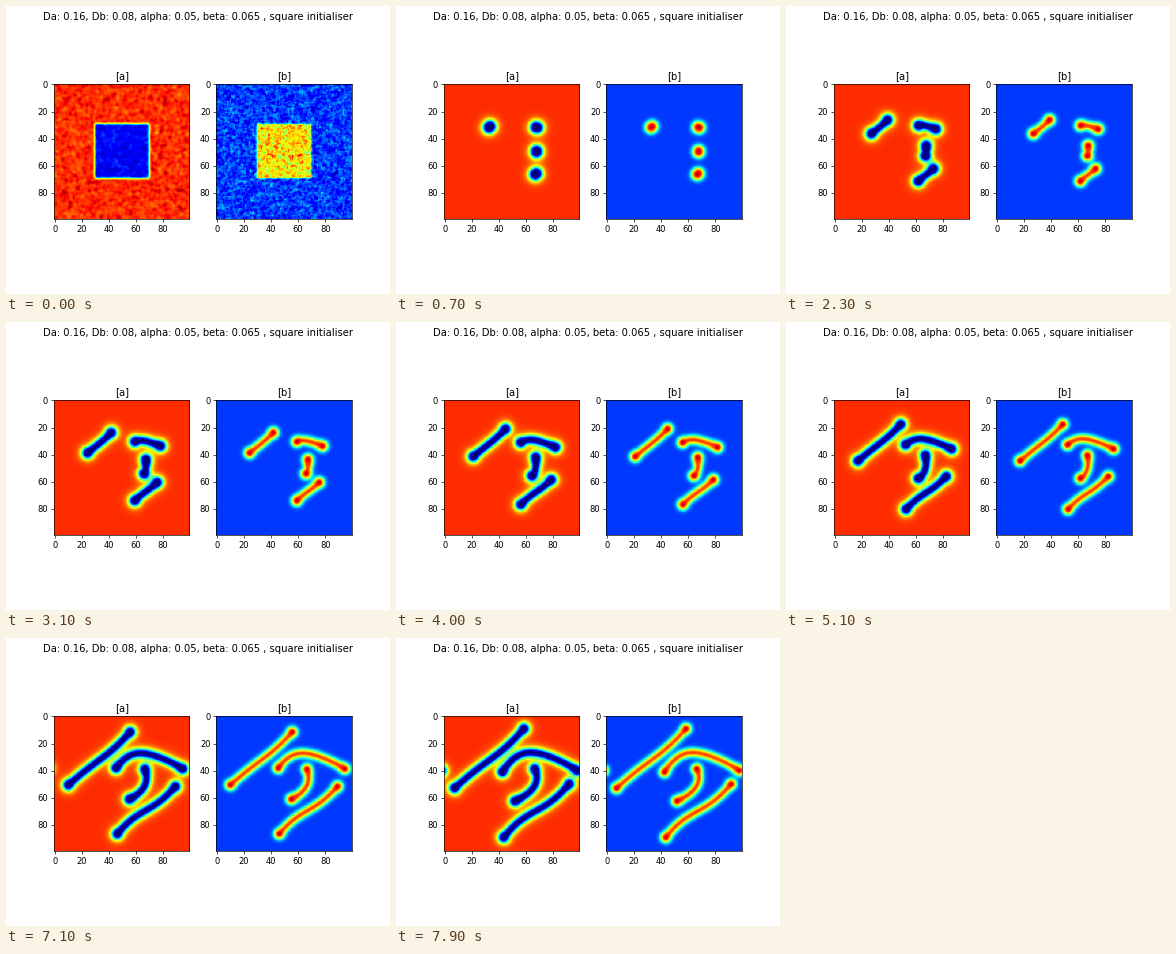
Recreate the animation shown at these times as a matplotlib script. Size 384 by 288 pixels, loop 8000 ms.

```python
import numpy as np
import matplotlib.pyplot as plt
from matplotlib.animation import FuncAnimation

N = 100
FRAMES, INTERVAL = 80, 100
A_REST, B_REST = 0.862, 0.18

grid = np.arange(N)
u = np.linspace(0, 1, 45)
rng = np.random.default_rng(4)


class Strand:
    """A spot that stretches into a curved strand with two growing tips."""

    def __init__(self, seed, tips, middle, sway=0.0, curls=((0, 0), (0, 0))):
        self.seed = np.array(seed)
        self.tips = np.array(tips)
        self.middle = np.array(middle)
        self.sway = sway
        self.curls = np.array(curls)

    def path(self, p):
        """Points at growth p: a parabola with a slight S bend."""
        tips = self.seed + p * (self.tips - self.seed) + 2 * p * (1 - p) * self.curls
        mid = self.seed + p * (self.middle - self.seed)
        span = tips[1] - tips[0]
        length = np.hypot(*span)
        normal = np.array([-span[1], span[0]]) / length
        bend = self.sway * (length / 60) ** 2 * np.sin(2 * np.pi * u)
        points = (np.outer((1 - u) * (1 - 2 * u), tips[0])
                  + np.outer(4 * u * (1 - u), mid)
                  + np.outer(u * (2 * u - 1), tips[1])
                  + np.outer(bend, normal))
        return points, length

    def fields(self, p):
        """Loss of a and gain of b around the strand."""
        points, length = self.path(p)
        dx2 = wrap(grid[:, None] - points[:, 0]) ** 2
        dy2 = wrap(grid[:, None] - points[:, 1]) ** 2
        dist = np.sqrt(dy2[:, None, :] + dx2[None, :, :])
        from_tip = length * np.minimum(u, 1 - u)
        bulge = 0.9 + 0.6 * np.exp(-length / 8)
        edge = (dist - bulge * np.exp(-(from_tip / 3) ** 2)).min(axis=2)
        edge = np.maximum(edge, 0)
        tip = np.minimum(dist[..., 0], dist[..., -1])
        loss = 1.1 / (1 + np.exp((edge - 2.5) / 1.35))
        loss += 0.04 * np.exp(-(edge / 7) ** 2)
        gain = 0.67 * np.exp(-(edge / 3.25) ** 2)
        gain += 0.08 * np.exp(-(tip / 2.2) ** 2)
        return loss, gain


STRANDS = [
    Strand((33, 31.8), [(7.3, 53.2), (58.3, 9.6)], (33.4, 32.3), -0.6),
    Strand((67.6, 32.2), [(42.5, 41.4), (97.4, 40.3)], (66.5, 27.3), -1.5,
           [(0, -10), (0, -2)]),
    Strand((67.6, 49.9), [(66.2, 39.2), (51.7, 62.8)], (65.8, 52), 0,
           [(0, -5), (8, 0)]),
    Strand((67, 66.3), [(43.5, 89.4), (91.5, 50.3)], (66.8, 70.2), -1.6),
]


def wrap(d):
    return (d + N / 2) % N - N / 2


def diffuse(z, rate, steps=2):
    for _ in range(steps):
        near = sum(np.roll(z, s, axis) for s in (-1, 1) for axis in (0, 1))
        z = z + rate * (near - 4 * z)
    return z


def noisy_start():
    side = (grid >= 30) & (grid < 70)
    box = np.outer(side, side)
    noise = rng.normal(0, 1, (2, N, N))
    a = A_REST - 0.755 * box + 0.09 * noise[0]
    b = B_REST + 0.49 * box + (0.105 + 0.05 * box) * noise[1]
    return diffuse(a, 0.16), diffuse(b, 0.08)


START = noisy_start()


def fields(step):
    if step == 0:
        return START
    growth = max(step - 6, 1) / (FRAMES - 7)
    strength = min(1, 0.6 + 0.1 * step)
    side = 1 / (1 + np.exp((np.abs(grid - 49.5) - 20) / 1.5))
    a = A_REST - 0.12 * np.exp(-1.3 * (step - 1)) * np.outer(side, side)
    b = np.full((N, N), B_REST)
    for strand in STRANDS:
        loss, gain = strand.fields(growth)
        a -= strength * loss
        b += strength * gain
    return np.clip(a, 0, 1), np.clip(b, 0, 1)


fig, axes = plt.subplots(1, 2, figsize=(6.4, 4.8), dpi=60)
fig.suptitle("Da: 0.16, Db: 0.08, alpha: 0.05, beta: 0.065 , square initialiser",
             fontsize=12)
images = []
for ax, name, data in zip(axes, "ab", START):
    images.append(ax.imshow(data, cmap="jet", vmin=0, vmax=1))
    ax.set_title(f"[{name}]", fontsize=12)
    ax.set_xticks(range(0, N, 20))
    ax.set_yticks(range(0, N, 20))


def update(step):
    for image, data in zip(images, fields(step)):
        image.set_data(data)
    return images


anim = FuncAnimation(fig, update, frames=FRAMES, interval=INTERVAL,
                     repeat=True, repeat_delay=0)
plt.show()
```
